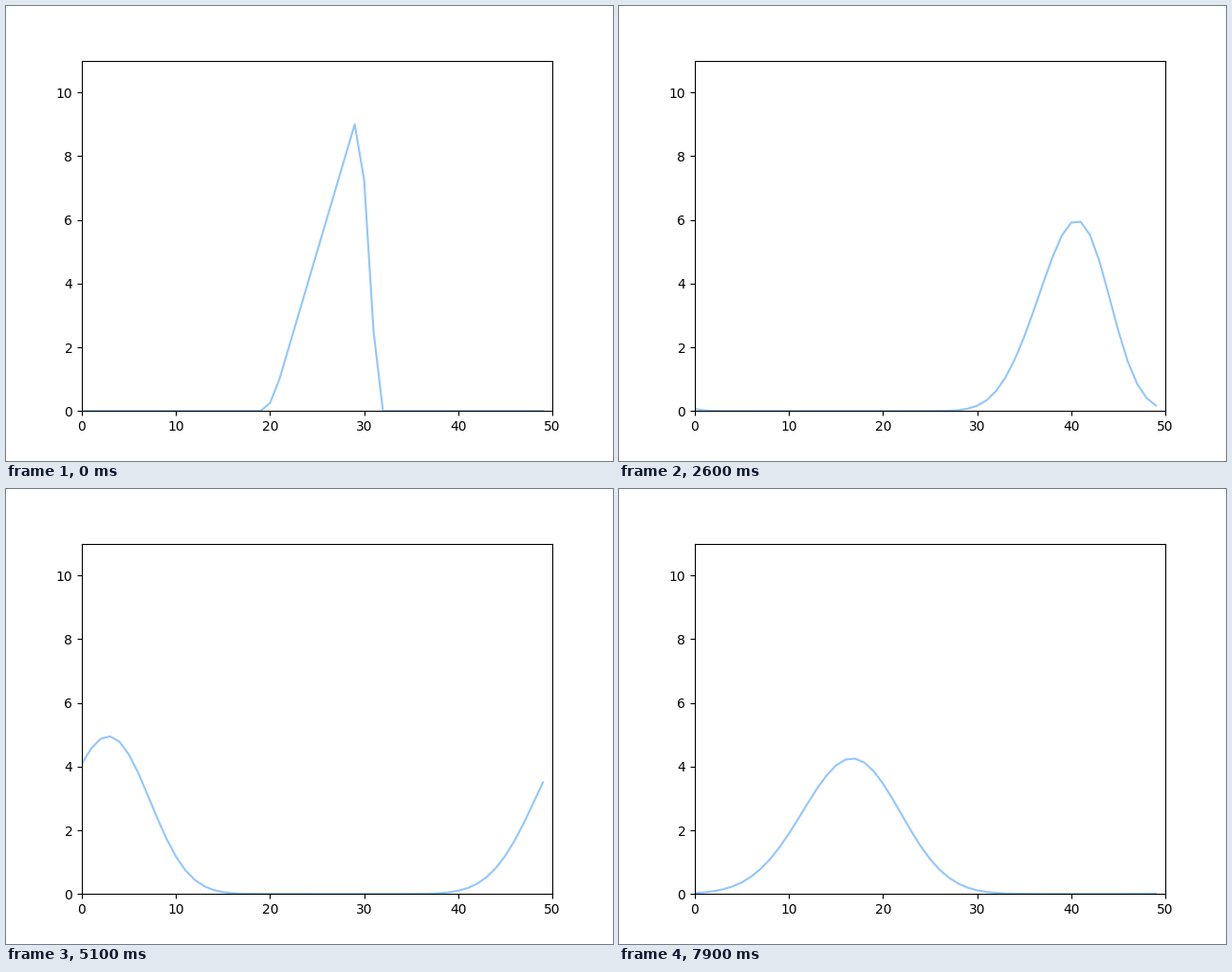
Recreate the animation shown at these times as a matplotlib script. Size 640x480 px, loop 8 s.

```python
import numpy as np
import matplotlib.pyplot as plt
from matplotlib.animation import FuncAnimation

CELLS = 50
FRAMES = 80
COURANT = 0.5
WARMUP = 2  # steps already taken when the loop begins


def advect(u):
    """One first-order upwind step on a periodic grid."""
    return u - COURANT * (u - np.roll(u, 1))


def solve(steps):
    x = np.arange(CELLS)
    u = np.where((x >= 20) & (x < 30), x - 19.0, 0.0)
    states = [u]
    for _ in range(steps):
        states.append(advect(states[-1]))
    return x, states


x, states = solve(WARMUP + FRAMES)

fig, ax = plt.subplots(figsize=(6.4, 4.8), dpi=100)
ax.set_xlim(0, 50)
ax.set_ylim(0, 11)
line, = ax.plot(x, states[WARMUP], color="#92C6FF", lw=1.5)


def init():
    line.set_ydata(states[WARMUP])
    return line,


def update(i):
    line.set_ydata(states[WARMUP + i])
    return line,


anim = FuncAnimation(fig, update, frames=FRAMES, init_func=init,
                     interval=100, repeat=True, repeat_delay=0)
plt.show()
```
